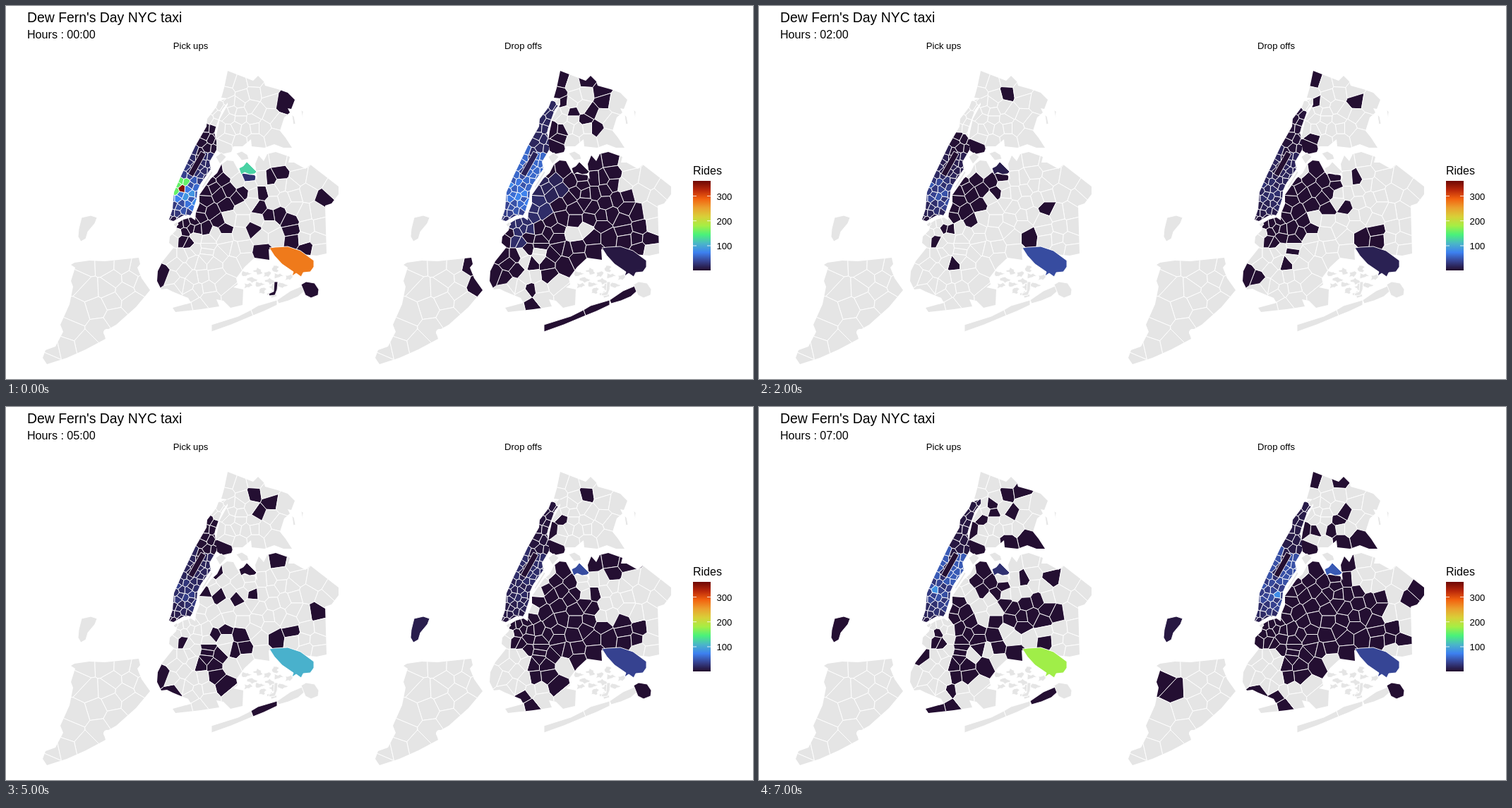
These frames come from a looping animation (1058x529 px, 8000 ms). An HTML page:

```html
<!DOCTYPE html>
<html lang="en">
<head>
<meta charset="utf-8">
<title>Taxi rides by hour</title>
<style>
html, body { margin: 0; width: 100%; height: 100%; overflow: hidden; background: #fff; }
svg { display: block; width: 100vw; height: 100vh; font-family: "Liberation Sans", Arial, sans-serif; }
.zone { stroke: #fff; stroke-width: .9; stroke-linejoin: round; }
.small { font-size: 13.1px; }
.mid { text-anchor: middle; }
</style>
</head>
<body>
<svg id="stage" viewBox="0 0 1058 529">
  <defs><linearGradient id="ramp" x1="0" y1="1" x2="0" y2="0"></linearGradient></defs>
  <text x="30" y="22.5" font-size="19.4">Dew Fern's Day NYC taxi</text>
  <text x="30" y="46.3" font-size="16.1" id="clock">Hours : 00:00</text>
  <text x="261.5" y="61" class="small mid">Pick ups</text>
  <text x="732.5" y="61" class="small mid">Drop offs</text>
  <text x="973" y="238.7" font-size="16">Rides</text>
  <rect x="973" y="248" width="25" height="127" fill="url(#ramp)"/>
  <path d="M973 269.5h5m15 0h5M973 304.7h5m15 0h5M973 340h5m15 0h5" stroke="#fff" stroke-width=".8"/>
  <g class="small">
    <text x="1006.5" y="274.5">300</text>
    <text x="1006.5" y="309.5">200</text>
    <text x="1006.5" y="345">100</text>
  </g>
</svg>
<script>
const NS = 'http://www.w3.org/2000/svg';
const stage = document.getElementById('stage');
const clock = document.getElementById('clock');
const EMPTY = '#e5e5e5', SHIFT = 471, MAX = 361, HOUR = 1000;
const RAMP = ['#230c2c', '#364290', '#3d80f0', '#4ab6c8', '#49f27a', '#a6ee44',
  '#d8d038', '#eba02e', '#f2620f', '#b8260a', '#6d0804'];

function add(parent, tag, attrs) {
  const node = document.createElementNS(NS, tag);
  for (const key in attrs) node.setAttribute(key, attrs[key]);
  return parent.appendChild(node);
}

const defs = stage.querySelector('defs');
RAMP.forEach((c, i) => add(document.getElementById('ramp'), 'stop', { offset: i / 10, 'stop-color': c }));

// Cut a box by the bisector to every other centre
function cell(p, all) {
  let poly = [[0, 60], [500, 60], [500, 529], [0, 529]];
  for (const q of all) {
    if (p === q) continue;
    const nx = q.x - p.x, ny = q.y - p.y;
    const c = nx * (p.x + q.x) / 2 + ny * (p.y + q.y) / 2;
    const side = v => v[0] * nx + v[1] * ny - c;
    const cut = [];
    poly.forEach((a, i) => {
      const b = poly[(i + 1) % poly.length], da = side(a), db = side(b);
      if (da <= 0) cut.push(a);
      if (da * db < 0) {
        const t = da / (da - db);
        cut.push([a[0] + t * (b[0] - a[0]), a[1] + t * (b[1] - a[1])]);
      }
    });
    poly = cut;
  }
  return poly.map(v => v.map(n => n.toFixed(1)).join()).join(' ');
}

const lands = [];
const extras = [];

// A coastline and the centres of the zones inside it
function land(outline, zones) {
  const clip = 'land' + lands.length;
  add(add(defs, 'clipPath', { id: clip }), 'polygon', { points: outline });
  lands.push({ clip, zones: zones.map(z => ({ ...z, shape: cell(z, zones) })) });
}

const extra = (name, shape) => extras.push({ name, shape });
const places = text => text.trim().split(/\s*,\s*/).map(item => {
  const [name, x, y] = item.split(' ');
  return { name, x: +x, y: +y };
});

// Street grid on a tilted axis, with larger blocks uptown
function grid() {
  const zones = [];
  for (let row = 0; row < 19; row++) {
    const up = row > 11;
    const s = up ? 51 + 13 * (row - 11) : 9.2 * row - 50;
    for (let col = 0; col < (up ? 3 : 5); col++) {
      const w = (up ? 10 * col - 10 : 8 * col - 13) + Math.sin(row * 2.1) * 1.2;
      const t = s + Math.sin(row * 1.7 + col * 2.9) * 2;
      const x = 257 + .447 * t + .894 * w - Math.max(0, s - 70) * .2;
      zones.push({ name: `r${row}c${col}`, row, col, x, y: 257 - .894 * t + .447 * w });
    }
  }
  return zones;
}

const bronx = places(`riverdale 316 106, cortlandt 331 111, wakefield 352 106, olinville 351 124, eastchester 371 121,
  coop 375 134, pelham 393 137, country 384 165, throgs 379 184, castle 352 190, pelhambay 374 157, westch 365 172,
  vannest 350 162, parkway 357 150, allerton 347 143, parkchester 352 172, norwood 336 128, bedford 329 138,
  kingsbridge 318 137, spuyten 312 124, fordham 321 148, belmont 331 151, tremont 331 161, crotona 326 171,
  farms 340 174, hunts 331 193, melrose 313 187, haven 308 199, morris 316 176, concourse 304 175, hope 317 159,
  univ 310 152`);

const brooklyn = places(`greenpoint 282 277, wburg 276 287, wburgs 274 299, ewburg 291 291, promenade 247 310,
  downtown 255 309, navy 266 305, fort 262 315, clinton 271 317, boerum 253 320, columbia 243 322, redhook 237 331,
  gowanus 251 332, slope 259 336, prospect 267 344, prospecthts 269 328, crown 286 332, crowns 286 341,
  bedstuy 283 316, stuy 297 322, bushwick 302 306, bushwicks 309 316, ocean 309 329, brownsville 312 343,
  eastny 336 343, cypress 333 323, penn 325 346, starrett 337 358, canarsie 320 366, farragut 294 365,
  remsen 303 352, lefferts 285 348, ditmas 275 365, erasmus 284 357, flatlands 297 382, midwood 277 384,
  mill 308 394, madison 285 400, homecrest 272 402, gravesend 263 409, brighton 272 425, coney 255 429,
  floyd 322 411, sheeps 287 413, bense 257 398, bensw 246 396, bath 238 402, dyker 235 386, bayridge 222 381,
  sunset 241 365, sunsetw 233 354, borough 252 374, kensington 265 362, oceanpk 266 386, greenwood 251 354,
  windsor 260 350`);

const queens = places(`astoria 306 245, oldastoria 298 236, steinway 317 233, bridge 289 249, lic 283 261,
  plaza 293 257, sunnyside 303 268, woodside 316 262, jackson 330 249, elmhurst 336 264, elmmas 327 272,
  maspeth 312 281, ridgewood 316 301, middle 335 288, glendale 335 304, eastelm 344 243, corona 350 266,
  ncorona 345 254, meadows 363 265, willets 363 246, flushing 375 245, hill 377 261, whitestone 385 217,
  college 361 221, murray 388 238, bayside 414 243, terrace 409 222, auburn 404 255, douglas 437 247,
  oakland 427 264, glen 462 262, eflush 389 253, fresh 408 269, hillcrest 395 274, kewhills 378 279,
  forest 356 303, foresthills 359 286, rego 349 279, briar 386 296, estates 408 287, jamaica 402 304,
  kew 373 298, richmond 373 311, sozone 382 328, sjam 405 319, baisley 407 331, ozone 361 328, woodhaven 350 316,
  howard 363 348, laurel 439 331, springs 426 343, springn 422 330, albans 427 314, village 441 291,
  hollis 422 294, cambria 446 312, belle 452 273, rosedale 441 346`);

const staten = places(`westerleigh 152 388, bloom 103 388, heart 128 428, arrochar 176 386, staple 185 372,
  rose 194 393, mariners 112 368, port 140 367, george 166 368, spring 118 402, kills 102 436, ross 92 460,
  charles 66 488, great 132 458, todt 150 417, emerson 167 404, dorp 178 420, elting 112 478, totten 60 502,
  pleasant 84 484, oakwood 155 442, willow 143 401`);

land(`314,92 350,106 357,99 365,107 367,113 385,118 399,123 409,133 404,146 399,145 402,151 394,158 388,177 396,187
  405,201 393,201 380,196 366,201 348,199 347,189 335,199 322,199 319,207 306,210 299,205 297,192 299,178 303,160
  314,140 314,131 305,130 309,116`, bronx);

land(`299,237 305,225 313,219 322,220 331,237 352,240 356,246 353,224 358,212 365,220 370,210 382,207 402,214
  400,222 408,222 424,231 431,225 471,256 471,267 461,280 452,283 454,351 440,354 420,352 380,345 372,345 373,360
  352,357 338,370 326,386 328,395 322,399 336,402 335,424 318,428 308,418 298,416 302,426 276,430 240,434 236,428
  262,421 258,414 236,405 228,401 220,402 214,390 215,376 222,362 238,342 231,336 232,327 241,318 243,308 251,303
  262,300 268,304 269,293 274,281 274,268 290,245`, brooklyn.concat(queens));

land(`301,135 314,131 314,137 306,147 297,172 295,180 298,192 298,204 288,221 290,231 276,251 271,262 270,273
  264,292 261,297 251,297 237,305 231,303 236,288 238,264 248,241 268,199 284,171 285,160 292,151 298,143`, grid());

land(`97,364 118,361 140,362 188,357 190,366 186,371 192,386 204,403 184,427 156,452 138,462 141,472 113,487
  86,499 58,508 52,499 56,488 70,483 81,462 77,452 90,423 95,398 92,390 98,371 92,367`, staten);

// Marsh islands scattered over the bay
for (let i = 0; i < 14; i++) {
  const a = i * 2.4, d = Math.sqrt(i + .5) / 3.8;
  const x = 368 + 34 * d * Math.cos(a), y = 390 + 22 * d * Math.sin(a);
  const shape = Array.from({ length: 11 }, (_, k) => {
    const b = k / 11 * Math.PI * 2, r = .8 + .35 * Math.sin(k * k * 2.3 + i * 1.7);
    return `${(x + 7.5 * r * Math.cos(b)).toFixed(1)},${(y + 5 * r * Math.sin(b)).toFixed(1)}`;
  });
  extra('marsh' + i, shape.join(' '));
}

extra('newark', '107,300 120,297 129,300 126,308 116,320 113,330 106,334 102,327 103,316');
extra('jfk', '373,343 381,342 399,341 417,347 436,361 436,370 431,377 421,378 418,384 411,379 405,383 407,377 391,366 380,354');
extra('laguardia', '330,230 336,227 341,221 346,226 355,235 352,238 345,239 338,236 333,239');
extra('breezy', '291,452 329,440 347,431 350,439 319,452 291,462');
extra('rockaway', '347,431 357,425 384,417 384,424 365,433 350,439');
extra('hammels', '384,417 403,404 422,396 424,403 414,412 400,418 386,422');
extra('far', '418,395 425,391 437,393 443,402 442,410 432,414 424,410');
extra('broad', '380,391 385,391 384,402 381,410 373,411 372,408 379,405');
extra('park', '258,238 265,242 283,210 276,206');
extra('randalls', '297,214 305,208 312,214 303,224');
extra('roosevelt', '277,257 291,234 293,236 279,258');
extra('governors', '237,310 242,306 244,310 240,313');
extra('rikers', '326,209 334,206 342,211 344,217 334,219');
extra('city', '405,154 408,157 410,167 407,168');
extra('hart', '418,147 421,150 420,160');

const groups = {
  core: 'promenade downtown navy fort clinton boerum gowanus slope',
  wside: 'greenpoint wburg wburgs ewburg',
  bush: 'bedstuy stuy bushwick bushwicks',
  crownhts: 'prospecthts crown crowns prospect ocean',
  flat: 'lefferts ditmas erasmus',
  eastbk: 'remsen farragut brownsville penn',
  west: 'astoria bridge lic plaza sunnyside woodside',
  central: 'jackson elmhurst elmmas maspeth',
  ridge: 'ridgewood middle glendale',
  hubs: 'forest foresthills rego kewhills kew briar',
  southq: 'richmond sozone sjam baisley ozone',
  sbronx: 'haven concourse morris'
};

// Each scene: [base, midtown, uptown sides, last row] for the grid, then the other zones with rides
const pickups = [], dropoffs = [];
const pick = (rides, text) => pickups.push({ rides, text });
const drop = (rides, text) => dropoffs.push({ rides, text });

pick([3, 85, 18, 14], `r5c1=350 r4c0=155 r5c0=155 r6c0=155 r6c1=155 r18c0 pelham wside core bedstuy bushwick bushwicks
  bayridge oldastoria west elmhurst elmmas maspeth eastelm=25 meadows foresthills flushing murray kew briar jamaica sjam
  baisley woodhaven howard springs belle jfk=275 laguardia=125 far broad park`);
drop([18, 58, 40, 17], `park=15 riverdale wakefield eastchester coop westch vannest parkway kingsbridge spuyten belmont
  sbronx melrose wside=22 core=22 columbia redhook bush crownhts brownsville eastny remsen farragut canarsie flatlands
  ditmas penn starrett homecrest brighton dyker bayridge sunset sunsetw borough greenwood west=16 oldastoria steinway
  central ridge eastelm corona ncorona meadows willets flushing hill whitestone college murray eflush fresh hillcrest
  estates jamaica hubs southq howard springs springn albans laurel hollis jfk=8 laguardia breezy rockaway hammels staple rose`);

pick([3, 66, 18, 14], `haven vannest parkway farms greenpoint ewburg downtown navy boerum gowanus slope flat
  west central eastelm=25 briar richmond springs jfk=68 laguardia=25 park`);
drop([9, 34, 18, 17], `park riverdale wakefield eastchester coop farms parkchester kingsbridge bedford haven melrose
  concourse wside=10 core columbia redhook bush crownhts flat farragut midwood homecrest mill floyd sunset sunsetw dyker
  bayridge oldastoria steinway west central middle eastelm corona ncorona meadows willets flushing college foresthills rego
  briar estates hillcrest sjam baisley howard laurel rosedale newark jfk=14 arrochar heart todt emerson`);

pick([3, 44, 10, 13], `olinville haven wside fort clinton gowanus bushwick ditmas west jackson elmhurst maspeth eastelm
  estates sozone jfk=42 laguardia=12 park`);
drop([5, 20, 12, 16], `riverdale coop kingsbridge melrose haven wside core prospecthts crown bush lefferts ditmas
  dyker bayridge steinway west central middle eastelm ncorona flushing foresthills sozone sjam baisley jfk=14 park`);

pick([3, 28, 4, 11], `olinville haven wburg ewburg fort clinton gowanus bushwick bushwicks starrett bense bensw
  astoria plaza sunnyside woodside jackson elmhurst elmmas eastelm ncorona kew estates sozone jfk=38 laguardia`);
drop([4, 12, 4, 16], `riverdale coop throgs haven wburg wburgs ewburg fort clinton gowanus slope prospecthts crown crowns
  bushwick cypress lefferts ditmas brighton bensw dyker steinway west central eastelm ncorona flushing whitestone
  douglas richmond sozone sjam baisley jfk=14`);

pick([3, 26, 12, 13], `olinville parkway haven fort gowanus bushwicks flat bayridge astoria sunnyside woodside maspeth
  eastelm sozone sjam jfk=60 laguardia park totten`);
drop([5, 8, 10, 15], `olinville haven concourse greenpoint wburg wburgs ewburg fort clinton slope crown crowns bedstuy
  stuy bushwicks flat flatlands astoria steinway plaza sunnyside woodside central meadows whitestone foresthills southq
  jfk=22 laguardia=12 park totten pleasant`);

pick([3, 30, 14, 15], `olinville coop parkway haven gowanus crowns stuy bushwicks cypress eastny penn flat remsen
  farragut flatlands mill bayridge bath oldastoria lic sunnyside elmmas corona whitestone village sozone sjam
  jfk=105 laguardia rockaway park`);
drop([6, 14, 16, 17], `olinville haven concourse hope greenpoint wburgs ewburg core crownhts bush brownsville eastny
  cypress penn starrett eastbk flat flatlands midwood mill gravesend brighton astoria steinway plaza sunnyside woodside
  central ridge meadows whitestone college murray terrace forest foresthills rego southq jamaica albans woodhaven howard
  springn newark=12 jfk=36 laguardia=42 far park`);

pick([6, 48, 26, 15], `olinville eastchester throgs castle bedford belmont haven melrose concourse hope clinton
  crown crowns brownsville eastny penn canarsie ocean ditmas midwood homecrest coney sunsetw kensington west oldastoria
  steinway jackson elmhurst glendale meadows willets foresthills kew briar richmond sozone sjam laurel springs village
  belle jfk=152 laguardia park westerleigh`);
drop([8, 24, 34, 16], `eastchester coop castle parkway allerton spuyten haven concourse hope greenpoint ewburg downtown
  clinton crown crowns bedstuy bushwicks brownsville canarsie lefferts ditmas mill floyd dyker bayridge borough sunset
  west oldastoria steinway central ridge eastelm corona ncorona meadows bayside fresh hillcrest foresthills estates
  jamaica kew sozone sjam baisley ozone howard newark=10 jfk=46 laguardia=42 hammels park`);

pick([8, 36, 42, 18], `r5c1=85 olinville eastchester throgs castle parkway bedford belmont haven concourse hope
  wside boerum gowanus slope crown crowns bush ocean brownsville cypress eastny canarsie flat farragut flatlands midwood
  homecrest brighton coney sunsetw astoria steinway woodside jackson elmhurst ncorona glendale flushing bayside hubs
  hillcrest estates jamaica richmond baisley hollis howard newark jfk=178 laguardia=25 hammels park`);
drop([10, 36, 34, 17], `r6c4=85 r7c4=85 r5c3=80 riverdale wakefield throgs castle vannest parkway farms sbronx
  wside core columbia redhook bush crownhts brownsville eastny cypress penn eastbk canarsie flat flatlands midwood
  gravesend brighton bath steinway west central ridge eastelm corona ncorona meadows willets hill college hubs fresh
  hillcrest estates jamaica southq woodhaven howard laurel springn albans belle glen newark=8 jfk=38 laguardia=50
  far park bloom spring`);

function buildMap(dx) {
  const map = add(stage, 'g', { transform: `translate(${dx} 0)` });
  const draw = (parent, z) => ({ ...z, node: add(parent, 'polygon', { class: 'zone', points: z.shape, fill: EMPTY }) });
  const zones = [];
  for (const { clip, zones: list } of lands) {
    const group = add(map, 'g', { 'clip-path': `url(#${clip})` });
    for (const z of list) zones.push(draw(group, z));
  }
  for (const z of extras) zones.push(draw(map, z));
  add(map, 'circle', { cx: 143, cy: 463, r: 5, fill: '#fff' });
  return zones;
}

function color(rides) {
  const f = Math.min(rides / MAX, .999) * 10, i = Math.floor(f);
  const part = (hex, n) => parseInt(hex.slice(n, n + 2), 16);
  const mix = n => Math.round(part(RAMP[i], n) + (f - i) * (part(RAMP[i + 1], n) - part(RAMP[i], n)));
  return `rgb(${mix(1)},${mix(3)},${mix(5)})`;
}

// Rides on the grid: a hump around midtown plus the sides of the park
function gridRides({ row, col }, [base, midtown, sides, last]) {
  if (row > last) return 0;
  const hump = Math.exp(-(((row - 4.5) / 3.2) ** 2));
  const vary = .8 + .25 * Math.sin(row * 4.1 + col * 2.3);
  const flank = row > 6 && row < 12 && col !== 1 ? sides : 0;
  return base + Math.max(midtown * hump * vary, flank);
}

function paint(zones, { rides, text }) {
  const busy = {};
  for (const token of text.trim().split(/\s+/)) {
    const [name, count] = token.split('=');
    for (const n of (groups[name] || name).split(' ')) busy[n] = +(count || 2);
  }
  for (const z of zones) {
    const n = busy[z.name] || (z.row >= 0 ? gridRides(z, rides) : 0);
    z.node.setAttribute('fill', n ? color(n) : EMPTY);
  }
}

const left = buildMap(0), right = buildMap(SHIFT);
let shown = -1;

function tick() {
  const hour = Math.floor(performance.now() / HOUR) % pickups.length;
  if (hour !== shown) {
    shown = hour;
    clock.textContent = `Hours : 0${hour}:00`;
    paint(left, pickups[hour]);
    paint(right, dropoffs[hour]);
  }
  requestAnimationFrame(tick);
}
tick();
</script>
</body>
</html>
```
